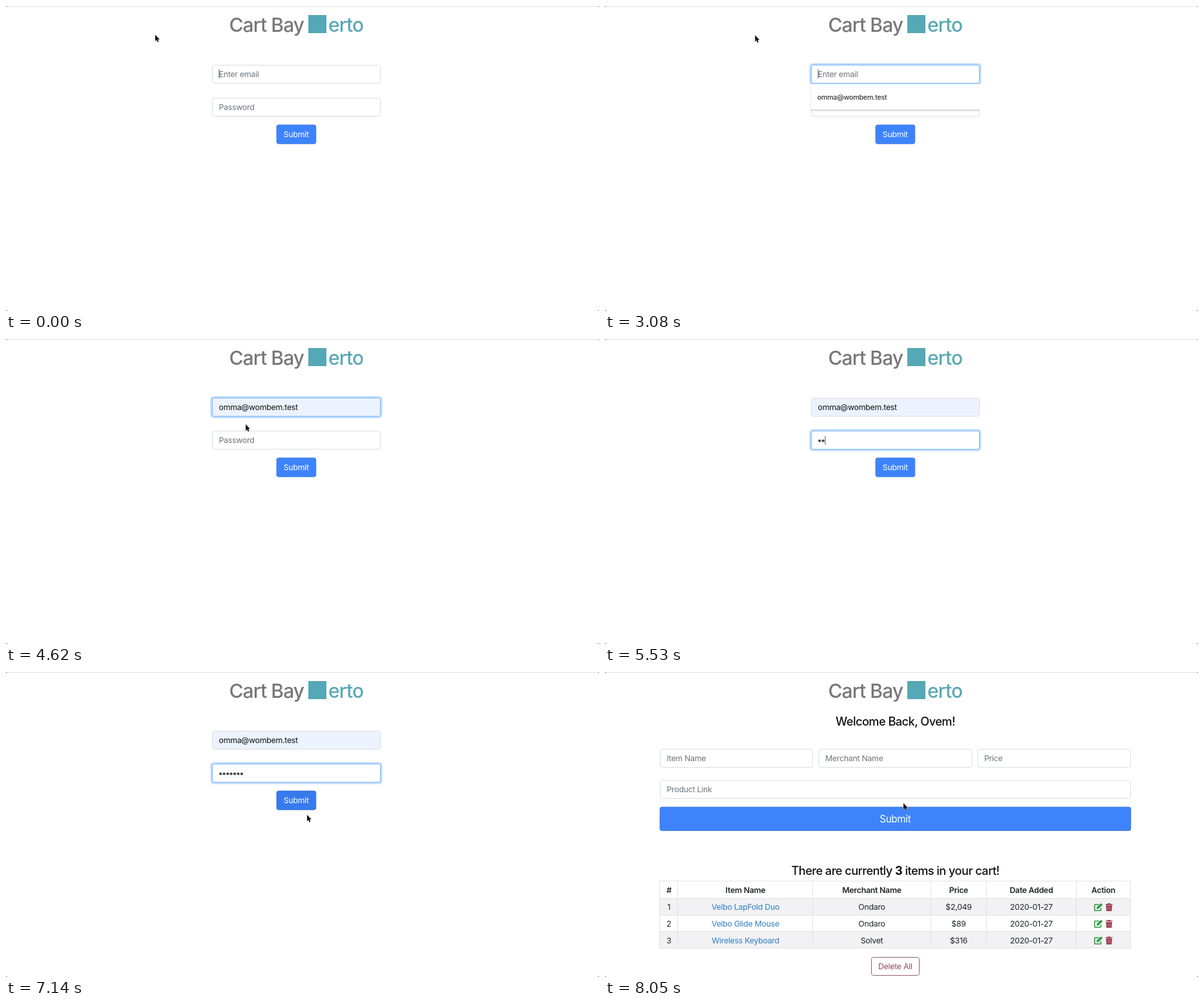
Recreate the animation shown at these times as an HTML page. Size 918 by 472 pixels, loop 8120 ms.

```html
<!DOCTYPE html>
<html lang="en">
<head>
<meta charset="utf-8">
<title>Sign in and cart</title>
<style>
  html, body { margin: 0; width: 100%; height: 100%; overflow: hidden; background: #666; }
  svg { display: block; width: 918px; height: 472px; }
  text { font-family: Inter, "Open Sans", sans-serif; letter-spacing: -.02em; }
  .title { letter-spacing: -.03em; font-weight: 500; }
</style>
</head>
<body>
<svg id="stage" viewBox="0 0 918 472"></svg>
<script>
const LOOP = 8120, STEP = 70;
const OPEN = 2520, PICK = 4480, TAB = 5040, PRESS = 7700, LOAD = 7980;
const KEYS = [5460, 5530, 6160, 6230, 6370, 6440, 6580];
const EMAIL = 'omma@wombem.test';
const stage = document.getElementById('stage');

const ramp = (t, a, b) => Math.min(1, Math.max(0, (t - a) / (b - a)));
const ease = (t, a, b) => { const p = ramp(t, a, b); return p * p * (3 - 2 * p); };
const fade = (t, start) => ramp(t, start, start + 150);
const mix = (a, b, p) => `rgb(${a.map((v, i) => Math.round(v + (b[i] - v) * p))})`;

const rect = (x, y, w, h, fill, extra = '') =>
  `<rect x="${x}" y="${y}" width="${w}" height="${h}" fill="${fill}" ${extra}/>`;
const text = (x, y, s, { size = 12.3, fill = '#212529', anchor = 'start', weight = 400, cls = '' } = {}) =>
  `<text x="${x}" y="${y}" font-size="${size}" fill="${fill}" text-anchor="${anchor}" ` +
  (cls ? `class="${cls}"` : `font-weight="${weight}"`) + `>${s}</text>`;
const centered = (x, y, s, o = {}) => text(x, y, s, { anchor: 'middle', ...o });
const line = (x1, y1, x2, y2, color) => `<path d="M${x1} ${y1}L${x2} ${y2}" stroke="${color}"/>`;

const ring = (x, y, w, h, p) => p <= 0 ? '' :
  rect(x - 1, y - 1, w + 2, h + 2, 'none', `rx="4" stroke="#007bff" stroke-width="3" opacity="${.27 * p}"`);

function field(x, y, w, label, focus = 0, fill = '#fff') {
  const border = mix([218, 221, 225], [134, 184, 245], focus);
  return ring(x, y, w, 29, focus) + rect(x + .5, y + .5, w - 1, 28, fill, `rx="3" stroke="${border}"`) +
    text(x + 10.5, y + 18.8, label, { fill: '#6c757d' });
}

function button(x, y, w, h, size, hover = 0) {
  const fill = mix([61, 132, 252], [47, 108, 215], hover), edge = mix([56, 115, 214], [42, 96, 195], hover);
  return rect(x, y, w, h, fill, `rx="3" stroke="${edge}" stroke-width=".8"`) +
    centered(449.3, y + h / 2 + size * .36, 'Submit', { size, fill: '#fff' });
}

function header() {
  return text(345.5, 39.5, 'Cart Bay', { size: 30, fill: '#77777b', cls: 'title' }) +
    rect(468, 14, 28, 28, '#55a8b5') +
    text(499, 39.5, 'erto', { size: 30, fill: '#5aa8b4', cls: 'title' });
}

function cursorAt(t) {
  const a = ease(t, 3030, 3900), b = ease(t, 6680, 7140), c = ease(t, 7300, 7560);
  return { x: 231 + 140 * a + 95 * b - 4 * c, y: 44.5 + 87.5 * a + 89 * b - 18 * c };
}

function cursor({ x, y }, hand) {
  const d = hand
    ? 'M-1 1Q0-1 1.2 1V5L5 5.6Q7 6 7 8L6 12.5H0L-3.8 8Q-4 6-2.4 6.6L-1 7.6Z'
    : 'M0 0V10L2.2 7.9 3.7 11.5 5.4 10.7 4 7.2H7Z';
  const paint = hand ? 'fill="#fff" stroke="#222"' : 'fill="#111" stroke="#fff" stroke-width=".9" paint-order="stroke"';
  return `<path transform="translate(${x} ${y})" d="${d}" ${paint} stroke-linejoin="round"/>`;
}

function suggestions(hovered) {
  return rect(318, 123, 262, 40, '#000', 'rx="3" opacity=".08"') +
    rect(319, 121, 261, 40, '#fff', 'rx="2"') + line(319, 161, 580, 161, '#c4c4c8') +
    (hovered ? rect(319, 127, 261, 28, '#dddbe0') : '') +
    text(328.5, 145, EMAIL, { size: 10.7, fill: '#333', weight: 500 });
}

function loginPage(t, pos) {
  const open = t >= OPEN && t < PICK, hovered = open && pos.y > 122;
  const filled = t >= PICK, dots = KEYS.filter(k => t >= k).length;
  const emailFocus = fade(t, 1120) - fade(t, TAB), passFocus = fade(t, TAB) - fade(t, PRESS);
  const caret = (x, y) => line(x, y, x, y + 14, '#555');
  const isButton = t > 6680 && pos.y > 184 && pos.y < 213;

  let out = field(319, 91, 261, filled || hovered ? '' : 'Enter email', emailFocus, filled || hovered ? '#ecf3fe' : '#fff');
  if (filled) out += text(329.5, 109.8, EMAIL, { fill: '#111' });
  else if (hovered) out += text(329.5, 110, EMAIL, { size: 8.9, fill: '#222' });
  else if (t < 2250 || Math.floor((t - 2250) / 500) % 2) out += caret(330, 98);

  out += field(319, 142, 261, dots ? '' : 'Password', passFocus);
  for (let i = 0; i < dots; i++) out += `<circle cx="${332.2 + i * 5.45}" cy="157.5" r="2.1" fill="#444"/>`;
  const lastKey = dots ? KEYS[dots - 1] : TAB;
  if (t >= TAB && t < PRESS && Math.floor((t - lastKey) / 500) % 2 === 0) out += caret(330 + dots * 5.45, 150);

  const hover = fade(t, 6890) - fade(t, 7050) + fade(t, 7400);
  out += ring(419, 184, 61, 29, fade(t, PRESS) * 1.3) + button(419, 184, 60.8, 29.2, 12.3, hover);
  if (open) out += suggestions(hovered);
  if (t < TAB || t >= 6680) out += cursor(pos, isButton);
  return out;
}

function actionIcons(y) {
  return `<g transform="translate(757 ${y})">
    <path d="M8 2H1.6Q1 2 1 2.6V10.8Q1 11.5 1.6 11.5H10Q10.6 11.5 10.6 10.8V7.5" fill="none" stroke="#2f9a3c" stroke-width="1.6"/>
    <path d="M4 9L4.4 6.4 10.8 0 13.4 2.5 6.8 8.8Z" fill="#2f9a3c"/>
    <path d="M18 1.2H21L21.6.2H25L25.6 1.2H28.6V2.6H18ZM18.7 3.4H27.9L27.3 12.3H19.3Z" fill="#8e2f42"/>
    <path d="M21.2 5V10.8M23.3 5V10.8M25.4 5V10.8" stroke="#d9b4bd" stroke-width=".7"/></g>`;
}

function cartTable() {
  const edges = [85, 113, 322, 505, 591, 730, 814], rows = [324, 351, 377, 402, 428];
  const centers = [99, 217.5, 413, 547.5, 660, 771.5];
  const items = [
    ['Velbo LapFold Duo', 'Ondaro', '$2,049'],
    ['Velbo Glide Mouse', 'Ondaro', '$89'],
    ['Wireless Keyboard', 'Solvet', '$316'],
  ];
  let out = rect(85, 351, 729, 26, '#f2f1f4') + rect(85, 402, 729, 26, '#f2f1f4');
  edges.forEach(x => out += line(x - .5, 324, x - .5, 428, '#e2e3e8'));
  rows.forEach(y => out += line(85, y - .5, 814, y - .5, '#e2e3e8'));
  ['#', 'Item Name', 'Merchant Name', 'Price', 'Date Added', 'Action'].forEach((s, i) =>
    out += centered(centers[i], 342, s, { weight: 600 }));
  items.forEach((item, r) => {
    const y = 368.3 + r * 25.7;
    [r + 1, ...item, '2020-01-27'].forEach((s, i) =>
      out += centered(centers[i], y, s, { fill: i === 1 ? '#337fc0' : '#212529' }));
    out += actionIcons(y - 10.5);
  });
  return out;
}

function cartPage(pos) {
  const heading = { size: 18.2, fill: '#111', cls: 'title' };
  return centered(449.5, 83, 'Welcome Back, Ovem!', heading) +
    field(85, 119, 237, 'Item Name') + field(330.5, 119, 238, 'Merchant Name') +
    field(576.5, 119, 237.5, 'Price') + field(85, 167, 729, 'Product Link') +
    button(85, 209, 729, 36.5, 15.2) +
    centered(449.5, 313.8, 'There are currently <tspan font-weight="700">3</tspan> items in your cart!', heading) +
    cartTable() +
    rect(412.5, 441.5, 74, 28, '#fff', 'rx="3" stroke="#96606c"') +
    centered(449.3, 460, 'Delete All', { fill: '#8c4a58' }) +
    cursor(pos, false);
}

function draw(t) {
  const pos = cursorAt(t);
  stage.innerHTML = rect(0, 0, 918, 472, '#fff', 'rx="3"') + line(3, .5, 915, .5, '#e2e2e2') +
    header() + (t < LOAD ? loginPage(t, pos) : cartPage(pos));
}

const start = performance.now();
let shown = -1;
function tick() {
  const t = Math.floor((performance.now() - start) % LOOP / STEP) * STEP;
  if (t !== shown) draw(shown = t);
  requestAnimationFrame(tick);
}
tick();
</script>
</body>
</html>
```
